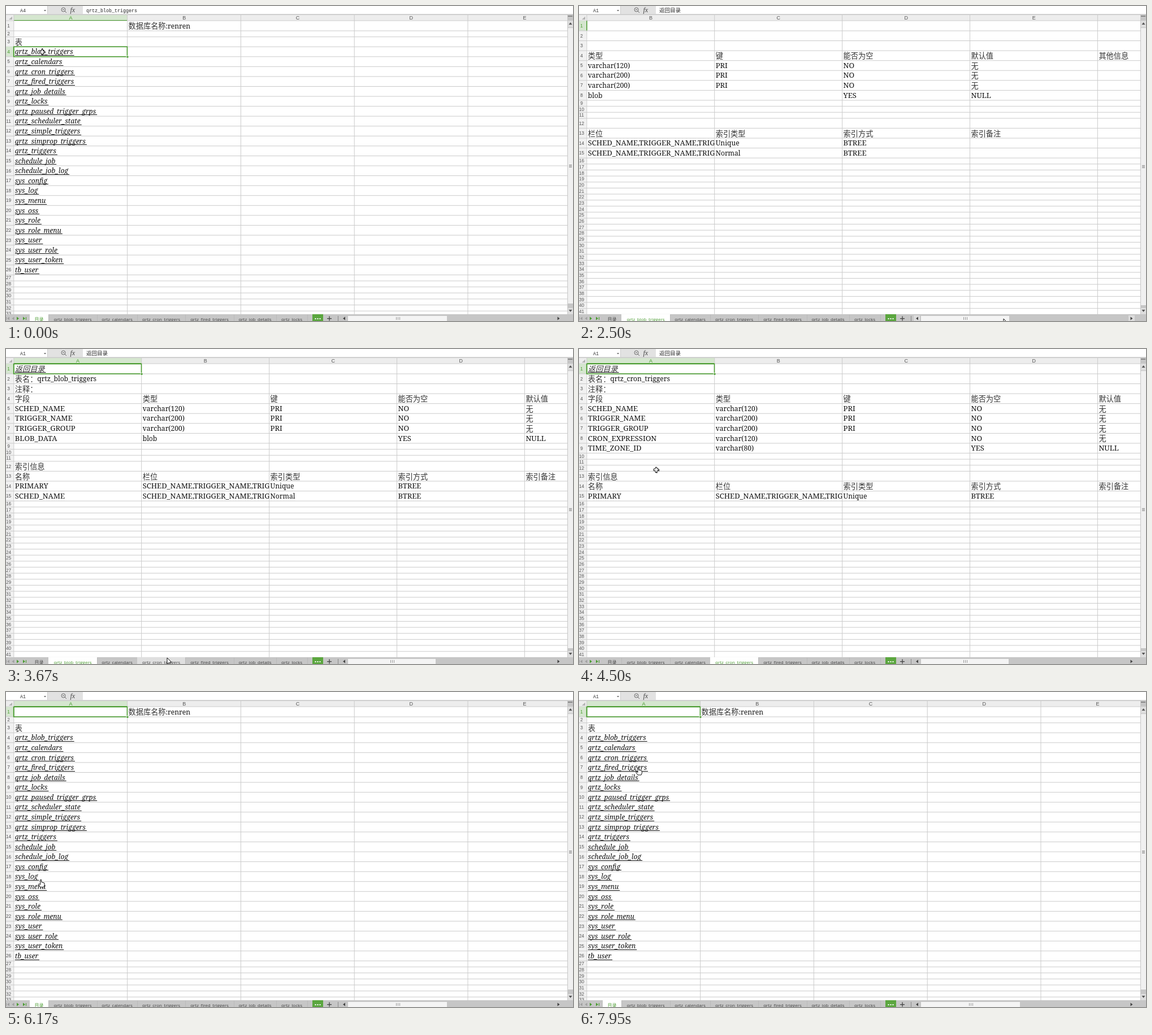
Animation of 1003 by 558 pixels, one loop 8000 ms. Source, as an HTML page with a canvas:

```html
<!DOCTYPE html>
<html lang="zh">
<head>
<meta charset="utf-8">
<style>
html, body { margin: 0; overflow: hidden; }
canvas { display: block; width: 1003px; height: 558px; }
</style>
</head>
<body>
<canvas width="1003" height="558"></canvas>
<script>
const ctx = document.querySelector('canvas').getContext('2d');
const GREEN = '#4a9c30', GRID = '#cbcbcb', BAR = '#c6c6c6';
const LEFT = 14, TOP = 26.2, RIGHT = 993, BOTTOM = 546, TALL = 17.57, LOW = 10.66;
const CJK = '"Noto Sans CJK SC", "Noto Sans CJK", sans-serif';
const SERIF = '"Noto Serif", serif', SANS = '"Liberation Sans", sans-serif';
const UI = `"Open Sans", ${CJK}`, MONO = `"Liberation Mono", ${CJK}`;

const links = `qrtz_blob_triggers qrtz_calendars qrtz_cron_triggers qrtz_fired_triggers qrtz_job_details
  qrtz_locks qrtz_paused_trigger_grps qrtz_scheduler_state qrtz_simple_triggers qrtz_simprop_triggers
  qrtz_triggers schedule_job schedule_job_log sys_config sys_log sys_menu sys_oss sys_role sys_role_menu
  sys_user sys_user_role sys_user_token tb_user`.split(/\s+/);
const tabNames = ['目录', ...links];
const firstTabs = { from: 0, x: 42, widths: [33, 86, 71, 85, 86, 75, 55] };
const laterTabs = { from: 10, x: 41, widths: [99, 67, 65, 79, 57, 44, 53, 35] };

// "-" marks an empty cell
const parse = text => text.trim().split('\n').map(line => line.trim().split(' ').map(c => c === '-' ? '' : c));

function table(name, note, fields, indexes, thumbEnd, tabs) {
  return {
    name, tabs, thumbEnd, width: 225.9, thumbRight: 760,
    isLink: (r, c) => r === 0 && c === 0,
    rows: [['返回目录'], ['表名：' + name], ['注释：' + note],
      ...parse('字段 类型 键 能否为空 默认值 其他信息\n' + fields.trim()), [], [], [],
      ...parse('索引信息\n名称 栏位 索引类型 索引方式 索引备注\n' + indexes.trim())]
  };
}

const triggerKeys = `SCHED_NAME varchar(120) PRI NO 无
  TRIGGER_NAME varchar(200) PRI NO 无
  TRIGGER_GROUP varchar(200) PRI NO 无\n`;
const keyList = 'SCHED_NAME,TRIGGER_NAME,TRIGGER_GROUP';
const primary = `PRIMARY ${keyList} Unique BTREE`;

const sheets = {
  index: {
    name: '目录', tabs: firstTabs, thumbEnd: 527, width: 200.8, thumbRight: 780,
    isLink: (r, c) => r > 2 && c === 0,
    rows: [['', '数据库名称:renren'], [], ['表'], ...links.map(l => [l])]
  },
  blob: table(links[0], '', triggerKeys + 'BLOB_DATA blob - YES NULL',
    `${primary}\nSCHED_NAME ${keyList} Normal BTREE`, 530, firstTabs),
  cron: table(links[2], '', triggerKeys + `CRON_EXPRESSION varchar(120) - NO 无
    TIME_ZONE_ID varchar(80) - YES NULL`, primary, 530, firstTabs),
  menu: table('sys_menu', '菜单管理', `menu_id bigint(20) PRI NO 无
    parent_id bigint(20) - YES NULL
    name varchar(50) - YES NULL
    url varchar(200) - YES NULL
    perms varchar(500) - YES NULL
    type int(11) - YES NULL
    icon varchar(50) - YES NULL
    order_num int(11) - YES NULL`, 'PRIMARY menu_id Unique BTREE', 521, laterTabs)
};

// start time, sheet, selected row, first column
const scenes = [[0, 'index', 3, 0], [120, 'blob', 0, 0], [2100, 'blob', 0, 1], [3050, 'blob', 0, 0],
  [3900, 'cron', 0, 0], [5380, 'index', 0, 0], [6180, 'menu', 0, 0], [7380, 'index', 0, 0]];

// pointer moves: start, end, number of steps, [step, x, y] points
const moves = [
  [0, 120, 2, [[0, 64, 81.5]]],
  [390, 1350, 8, [[0, 160, 150], [2, 423, 283], [4, 520, 292], [7, 526, 285]]],
  [1470, 2500, 8, [[0, 560, 340], [3, 655, 551], [7, 751, 554]]],
  [2620, 3520, 8, [[0, 740, 554], [3, 650, 553], [7, 320, 552]]],
  [3670, 4620, 7, [[0, 285, 547], [2, 285, 547], [6, 87, 103]]],
  [4770, 5080, 3, [[0, 70, 75], [2, 51, 37]]],
  [5380, 6320, 8, [[0, 51, 37], [4, 60, 330], [7, 65, 338]]],
  [6440, 7100, 6, [[0, 55, 270], [2, 18, 70], [3, 20, 16], [5, 41, 40]]],
  [7380, 7950, 5, [[0, 41, 40], [4, 105, 134]]]
];

const lastStarted = (list, t) => list.filter(e => e[0] <= t).pop();

function pointerAt(t) {
  const [start, end, steps, points] = lastStarted(moves, t);
  const k = Math.min(steps - 1, Math.floor((t - start) / (end - start) * (steps - 1) + 0.1));
  const i = points.findIndex(p => p[0] >= k);
  if (i < 1) return points[0].slice(1);
  const [a, b] = [points[i - 1], points[i]], f = (k - a[0]) / (b[0] - a[0]);
  return [a[1] + (b[1] - a[1]) * f, a[2] + (b[2] - a[2]) * f];
}

function rect(x, y, w, h, color) {
  ctx.fillStyle = color;
  ctx.fillRect(x, y, w, h);
}

function text(s, x, y, font, color = '#222', align = 'left') {
  ctx.font = font;
  ctx.fillStyle = color;
  ctx.textAlign = align;
  ctx.fillText(s, x, y);
  return ctx.measureText(s).width;
}

function poly(points, fill, stroke) {
  ctx.beginPath();
  points.forEach(([x, y]) => ctx.lineTo(x, y));
  ctx.closePath();
  ctx.fillStyle = fill;
  ctx.fill();
  if (stroke) {
    ctx.strokeStyle = stroke;
    ctx.lineWidth = 1;
    ctx.stroke();
  }
}

const triangle = (x, y, dx, dy, color) => poly([[x + 2 * dx, y + 2 * dy],
  [x - 2 * dx + 3 * dy, y - 2 * dy + 3 * dx], [x - 2 * dx - 3 * dy, y - 2 * dy - 3 * dx]], color);

function cellText(s, x, y, link) {
  const start = x, style = link ? 'italic ' : '';
  for (const [run] of s.matchAll(/[\x00-\x7f]+|[^\x00-\x7f]+/g)) {
    const wide = run.charCodeAt(0) > 127;
    const size = wide ? 13.2 : /[a-z]/.test(run) ? 12.1 : 13;
    x += text(run, x, y + (wide ? 14.2 : 13.4), `${style}${size}px ${wide ? CJK : SERIF}`, wide ? '#333' : '#111');
  }
  if (link) rect(start, Math.round(y + 15), x - start + 2, 1, '#111');
}

function rowTops(sheet) {
  const tops = [TOP];
  for (let r = 0; tops[r] < BOTTOM; r++) tops.push(tops[r] + (sheet.rows[r]?.length ? TALL : LOW));
  return tops;
}

function drawGrid(sheet, selected, firstCol) {
  const tops = rowTops(sheet), colX = c => LEFT + (c - firstCol) * sheet.width;
  rect(0, 15, RIGHT, 11, '#ededed');
  rect(0, 26, 13, 520, '#f1f1f1');
  poly([[11, 18.5], [11, 24], [5, 24]], '#b5b5b5');
  ctx.save();
  ctx.beginPath();
  ctx.rect(0, 15, RIGHT, BOTTOM - 15);
  ctx.clip();

  rect(0, 15, RIGHT, 1, GRID);
  rect(0, 25.5, RIGHT, 1, GRID);
  for (let c = firstCol; colX(c) < RIGHT; c++) {
    const x = colX(c), lit = c === 0;
    if (lit) {
      rect(x, 16, sheet.width, 10, '#d5e6cf');
      rect(x, 25, sheet.width, 1, GREEN);
    }
    text(String.fromCharCode(65 + c), x + sheet.width / 2, 24, `9px ${SANS}`, lit ? GREEN : '#555', 'center');
    rect(x - 0.7, 15, 1, BOTTOM, GRID);
  }

  for (let r = 0; r < tops.length - 1; r++) {
    const y = tops[r], h = tops[r + 1] - y, lit = r === selected;
    if (lit) {
      rect(0, y, 13, h, '#d5e6cf');
      rect(13, y, 1.5, h, GREEN);
    }
    text(r + 1, 4.5, y + h / 2 + 3, `8.3px ${SANS}`, lit ? GREEN : '#555', 'center');
    rect(0, y + h - 0.3, RIGHT, 1, GRID);
    (sheet.rows[r] || []).forEach((s, c) => {
      if (c < firstCol || !s) return;
      ctx.save();
      ctx.beginPath();
      ctx.rect(colX(c), y, sheet.width - 0.5, h);
      ctx.clip();
      cellText(s, colX(c) + 1.8, y, sheet.isLink(r, c));
      ctx.restore();
    });
  }

  if (!firstCol) {
    const y = tops[selected], h = tops[selected + 1] - y;
    ctx.strokeStyle = GREEN;
    ctx.lineWidth = 1.6;
    ctx.strokeRect(13.6, y + 0.2, sheet.width, h);
    rect(11.8 + sheet.width, y + h - 1.8, 4, 4, '#fff');
    rect(12.6 + sheet.width, y + h - 1, 3, 3, GREEN);
  }
  ctx.restore();
}

function drawFormulaBar(sheet, selected) {
  rect(74, 0, 62, 14, '#e2e2e2');
  rect(0, 14, 1003, 1, '#d4d4d4');
  rect(73, 0, 1, 14, GRID);
  text('A' + (selected + 1), 30, 11, `8.3px ${MONO}`, '#333', 'center');
  poly([[67, 7], [71, 7], [69, 9.5]], '#666');
  ctx.strokeStyle = '#666';
  ctx.lineWidth = 1;
  ctx.beginPath();
  ctx.arc(101.5, 6.5, 3.5, 0, 7);
  ctx.moveTo(104, 9);
  ctx.lineTo(107, 12);
  ctx.moveTo(100, 6.5);
  ctx.lineTo(103, 6.5);
  ctx.stroke();
  text('fx', 113.5, 11, 'italic 12px "Liberation Serif", serif', '#444');
  const value = sheet.rows[selected][0];
  text(value, 142, 11, `${/[a-z]/.test(value) ? 8.35 : 9.5}px ${MONO}`);
}

function drawScrollbar(sheet) {
  rect(RIGHT, 15, 10, 531, BAR);
  rect(RIGHT + 1, 17, 8, 2, '#888');
  rect(RIGHT + 1, 26, 9, 12, '#dedede');
  rect(RIGHT + 1, 39, 9, sheet.thumbEnd - 39, '#f0f0f0');
  rect(RIGHT + 1, 535, 9, 11, '#dedede');
  triangle(998.5, 31, 0, -1, '#555');
  triangle(998.5, 540, 0, 1, '#555');
  const mid = Math.round((sheet.thumbEnd + 38) / 2);
  for (const d of [-2, 0, 2]) rect(996, mid + d, 5, 1, '#888');
}

function drawTabBar(sheet, firstCol, px, py) {
  rect(0, BOTTOM, 1003, 12, BAR);
  const back = sheet.tabs === laterTabs ? GREEN : '#a0a0a0';
  triangle(4, 553.5, -1, 0, back);
  rect(0, 551, 1, 5, back);
  triangle(12.5, 553.5, -1, 0, back);
  triangle(21, 553.5, 1, 0, GREEN);
  triangle(32, 553.5, 1, 0, GREEN);
  rect(35, 551, 1, 5, GREEN);

  let x = sheet.tabs.x;
  sheet.tabs.widths.forEach((w, i) => {
    const name = tabNames[sheet.tabs.from + i], active = name === sheet.name;
    if (active) rect(x, BOTTOM, w, 12, '#fff');
    else if (py > BOTTOM && px > x && px < x + w) rect(x, BOTTOM, w, 12, '#dfdfdf');
    rect(x + w, 547, 1, 11, '#bababa');
    text(name, x + w / 2, 557.5, `8px ${UI}`, active ? GREEN : '#444', 'center');
    x += w;
  });

  rect(542, BOTTOM, 19, 12, '#5ba63f');
  for (const d of [-4, 0, 4]) rect(550.5 + d, 553, 2, 2, '#fff');
  rect(568, 553, 8, 1.3, '#444');
  rect(571.4, 549.5, 1.3, 8, '#444');
  rect(587, 549, 1, 9, '#888');

  const hover = py > BOTTOM && px > 593 && px < 984;
  if (hover) for (const bx of [592, 972]) rect(bx, 548, 11, 10, '#dcdcdc');
  triangle(598, 553.5, -1, 0, '#444');
  triangle(977.5, 553.5, 1, 0, '#444');
  const end = sheet.thumbRight + firstCol;
  rect(605, 549, end - 605, 9, '#f4f4f4');
  for (const d of [-3, 0, 3]) rect(Math.round((605 + end) / 2) + d, 551, 1, 5, '#999');
}

const cursors = {
  cross: [[-1.5, -4.5], [1.5, -4.5], [1.5, -1.5], [4.5, -1.5], [4.5, 1.5], [1.5, 1.5], [1.5, 4.5],
    [-1.5, 4.5], [-1.5, 1.5], [-4.5, 1.5], [-4.5, -1.5], [-1.5, -1.5]],
  arrow: [[0, 0], [0, 11], [2.6, 8.6], [4.4, 12.4], [6, 11.6], [4.4, 8], [7.8, 7.8]],
  hand: [[-1, 0], [1, 0], [1, 4], [6, 5.5], [6.5, 9], [5, 13], [-1, 13], [-4.5, 8], [-3.5, 7], [-1, 8.5]]
};

function pointerKind(sheet, x, y, t) {
  if (y > BOTTOM || y < 26) return 'arrow';
  const row = rowTops(sheet).findIndex(top => top > y) - 1;
  const s = sheet.rows[row]?.[0];
  return t >= 120 && s && sheet.isLink(row, 0) && x < 20 + s.length * (s.length > 4 ? 6 : 13.2) ? 'hand' : 'cross';
}

function drawPointer(sheet, x, y, t) {
  const kind = pointerKind(sheet, x, y, t);
  poly(cursors[kind].map(([dx, dy]) => [x + dx, y + dy]), '#fff', '#111');
  if (kind === 'cross') {
    rect(x - 1, y + 4.5, 3.5, 1, '#111');
    rect(x + 4.5, y - 1, 1, 3.5, '#111');
  }
}

function draw(now) {
  const t = now % 8000;
  const [, key, selected, firstCol] = lastStarted(scenes, t);
  const sheet = sheets[key], [px, py] = pointerAt(t);
  rect(0, 0, 1003, 558, '#fff');
  drawFormulaBar(sheet, selected);
  drawGrid(sheet, selected, firstCol);
  drawScrollbar(sheet);
  drawTabBar(sheet, firstCol, px, py);
  drawPointer(sheet, px, py, t);
}

const begin = performance.now();
(function loop() {
  draw(performance.now() - begin);
  requestAnimationFrame(loop);
})();
</script>
</body>
</html>
```
